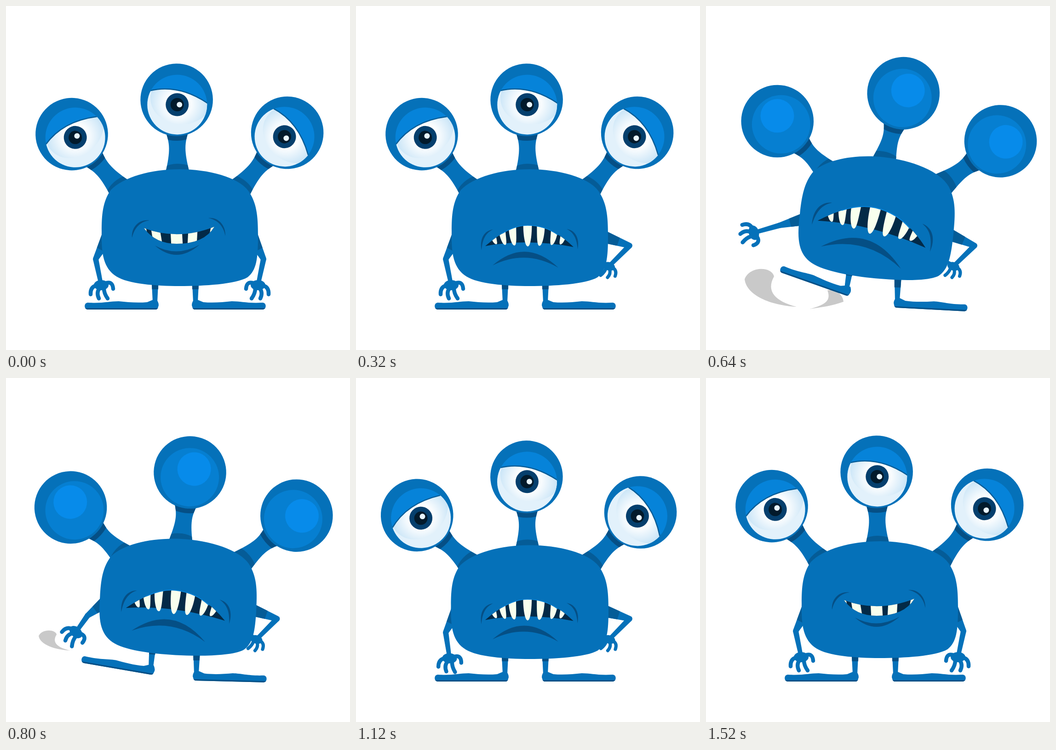
An HTML page with a canvas for the animation above (1600 ms loop, 748 by 748 pixels).

```html
<!DOCTYPE html>
<html lang="en">
<head>
<meta charset="utf-8">
<title>Three-eyed monster</title>
<style>
  html, body { margin: 0; width: 100%; height: 100%; overflow: hidden; background: #fff; }
  canvas { display: block; width: 100vw; height: 100vh; }
</style>
</head>
<body>
<canvas id="stage" width="748" height="748"></canvas>
<script>
const ctx = document.getElementById('stage').getContext('2d');
const LOOP = 1600, STEP = 80;
const SKIN = '#0571b9', SHADE = '#055c97', DARK = '#054f85', LID = '#0683d9',
      MOUTH = '#032a47', TOOTH = '#f8ffee', DUST = '#c9c9c9';

// Each part rests somewhere and is pushed by weighted moods
const rig = {
  body: { // x, y, rotation, scale x, scale y
    rest: [378, 482, 0, 1, 1], lean: [-6.5, -18, 5.8, 0, 0],
    yell: [1, -4, .2, -.01, .04], squat: [-.5, 10.5, 0, .015, -.05] },
  tilts: { // stalk angles
    rest: [-41.5, -.7, 40.3], lean: [-4, 16.5, 17.2], yell: [1, 0, -4.3], droop: [-9, 0, 6.4] },
  leftArm: { // elbow, palm, hand rotation, hand scale
    rest: [195, 550, 207, 607, 0, 1], lean: [-30, -59, -65, -69, 34, 0],
    yell: [-5, -14, -38, -45, 41, 0], squat: [0, 6, -7, 5, 8, 0] },
  rightArm: {
    rest: [560, 550, 548, 607, 0, 1], hip: [35, -29, 2, -41, 17, -.17],
    lean: [-11, 0, -12, 0, 0, 0], squat: [0, 5, 1, 5, 0, 0] },
  leftFoot: { rest: [325, 652, 0], lean: [-18, -30, 19.5] }, // heel, rotation
  rightFoot: { rest: [411, 652, 0], lean: [4, -4, 3] },
  frown: { rest: [0, 0, 0, 1], lean: [0, 0, 2, 0], yell: [-7, -6, 5.5, .26] } // offset, rotation, scale
};

// Piecewise linear curve through [time, value] points
function curve(t, ...points) {
  const i = points.findIndex(p => p[0] > t);
  if (i === 0) return points[0][1];
  if (i < 0) return points[points.length - 1][1];
  const [t0, a] = points[i - 1], [t1, b] = points[i];
  return a + (b - a) * (t - t0) / (t1 - t0);
}

const moodsAt = t => ({
  lean: curve(t, [320, 0], [480, 1], [560, 1.15], [640, 1], [960, 0]),
  yell: curve(t, [480, 0], [640, 1], [960, 0]),
  squat: curve(t, [640, 0], [960, 1], [1280, 0]),
  droop: curve(t, [640, 0], [960, 1], [1280, .25], [1520, 0]),
  hip: curve(t, [0, 0], [320, 1], [1120, 1], [1280, .33], [1440, 0]),
  lid: curve(t, [480, 0], [640, 1], [800, 1], [960, 0])
});

const pose = ({ rest, ...pushes }, moods) => rest.map((v, i) =>
  Object.entries(pushes).reduce((sum, [mood, push]) => sum + moods[mood] * push[i], v));

const rad = deg => deg * Math.PI / 180;

function at(x, y, deg, sx, sy, draw) {
  ctx.save();
  ctx.translate(x, y);
  ctx.rotate(rad(deg));
  ctx.scale(sx, sy);
  draw();
  ctx.restore();
}

function fill(path, color) {
  ctx.fillStyle = color;
  ctx.fill(new Path2D(path));
}

function stroke(path, color, width) {
  ctx.strokeStyle = color;
  ctx.lineWidth = width;
  ctx.stroke(new Path2D(path));
}

function oval(x, y, rx, ry, color) {
  ctx.beginPath();
  ctx.ellipse(x, y, rx, ry, 0, 0, 7);
  ctx.fillStyle = color;
  ctx.fill();
}

const disc = (x, y, r, color) => oval(x, y, r, r, color);

function clipped(path, draw) {
  ctx.save();
  ctx.clip(new Path2D(path));
  draw();
  ctx.restore();
}

function limb(x1, y1, x2, y2, w1, w2, color) {
  const d = Math.hypot(x2 - x1, y2 - y1), nx = (y1 - y2) / d, ny = (x2 - x1) / d;
  fill(`M${x1 + nx * w1} ${y1 + ny * w1}L${x2 + nx * w2} ${y2 + ny * w2}
        L${x2 - nx * w2} ${y2 - ny * w2}L${x1 - nx * w1} ${y1 - ny * w1}Z`, color);
}

// Body-relative point to stage
function onBody([x, y, deg, sx, sy], px, py) {
  const c = Math.cos(rad(deg)), s = Math.sin(rad(deg));
  return [x + px * sx * c - py * sy * s, y + px * sx * s + py * sy * c];
}

function drawDust(t) {
  if (t < 400 || t > 960) return;
  if (t < 640) {
    const k = (t - 480) / 80;
    return oval(214.5 - 21 * k, 635.5 - 8 * k, 61 + 32 * k, 27.5 + 12 * k, DUST);
  }
  const k = (t - 640) / 320, right = Math.max(0, 1 - 2 * k);
  at(115 - 50 * k, 600 - 72 * k, 0, 1 - .78 * k, 1 - .94 * k, () =>
    fill('M82 54C35 42 15 20 33-12C28-34-20-35-31-6C-27 29 25 51 82 54', DUST));
  if (right) at(275 - 60 * k, 640 - 30 * k, 0, right, right, () =>
    fill('M-50 19C-13 9-3 0-11-22C5-25 22-15 24 3C0 12-25 15-50 19', DUST));
  if (t >= 880) stroke('M39.5 551Q41 545 47 541', DUST, 1);
}

function drawFoot([x, y, deg], flip) {
  at(x, y - 8, deg / 2, flip, 1, () => {
    fill('M-6 0L-9-60H7L4 0Z', SKIN);
    fill('M-7.5-28L-9-60H7L6-28Z', DARK);
  });
  at(x, y, deg, flip, 1, () => {
    const foot = 'M-147-7C-115-5-100-10-80-10C-60-8-40-6-18-8L-6-13H3Q9-4 6 2Q5 8 0 8H-147C-156 8-156-7-147-7';
    fill(foot, SKIN);
    clipped(foot, () => {
      ctx.fillStyle = DARK;
      ctx.fillRect(-160, 5, 180, 4);
    });
  });
}

function drawStalk(length) {
  const end = length + 8, bend = length - 45;
  const stalk = `M-26 66C-16 95-14 ${bend}-27 ${end}H27C14 ${bend} 16 95 26 66Z`;
  fill(stalk, SKIN);
  clipped(stalk, () => {
    oval(0, end, 42, 23, SHADE);
    disc(0, 0, 89, DARK);
  });
}

function drawEyeball(lid) {
  if (lid >= 1) {
    disc(0, 0, 63.5, '#067fd1');
    disc(7, -19, 36.5, '#078bea');
    return;
  }
  disc(0, 0, 65, LID);
  clipped('M-65 0A65 65 0 0 0 65 0A65 65 0 0 0-65 0', () => {
    const drop = lid * 110;
    const edge = `M-80 ${drop - 28}L-59 ${drop - 31}Q3 ${drop - 45} 65 ${drop - 3}L80 ${drop + 10}`;
    clipped(edge + 'V200H-80Z', () => {
      disc(0, 0, 70, '#e2f1fb');
      const glow = ctx.createRadialGradient(2, -2, 24, 2, -2, 68);
      glow.addColorStop(0, '#fff');
      glow.addColorStop(1, '#c4e2f6');
      oval(10, -14, 68, 57, glow);
      disc(0, 0, 25, '#053f6d');
      disc(0, 0, 14.5, '#021a2b');
      disc(5, 0, 6, '#e8f5fd');
    });
    stroke(edge, SHADE, 2.5);
  });
}

function drawEye([x, y], tilt, length, lid) {
  at(x, y, tilt, 1, 1, () => {
    ctx.translate(0, -length);
    drawStalk(length);
    disc(0, 0, 78.8, SKIN);
    ctx.translate(1, 10.5);
    drawEyeball(lid);
  });
}

function drawArm([sx, sy], [ex, ey, hx, hy]) {
  limb(sx, sy, ex, ey, 14, 6, SKIN);
  limb(sx, sy, sx + (ex - sx) * .6, sy + (ey - sy) * .6, 14, 9.2, SHADE);
  disc(ex, ey, 6, SKIN);
  limb(ex, ey, hx, hy, 6, 4.5, SKIN);
}

function drawHand([, , x, y, deg, scale], flip) {
  at(x, y, deg, flip * scale, scale, () => {
    oval(0, 0, 16, 11, SKIN);
    ctx.lineCap = 'round';
    stroke('M-12 1Q-24 5-23 20M-4 7Q-11 17-5 29M6 7Q6 18 14 29M12-5Q25-8 26 8', SKIN, 8.5);
  });
}

function drawSmile() {
  clipped('M-77-40Q-3-12 76-43Q54-6-6-6Q-52-6-77-40', () => {
    ctx.fillStyle = MOUTH;
    ctx.fillRect(-80, -50, 160, 60);
    for (const [x, w] of [[-78, 8], [-60, 19], [-19, 25], [19, 20], [66, 14]])
      fill(`M${x * 1.06}-50h${w}L${x * .92 + w} 0h${-w}Z`, TOOTH);
  });
  fill('M-103-19C-105-42-88-60-65-57C-84-54-97-43-103-19', DARK);
  fill('M100-23C101-46 85-64 63-62C82-58 95-47 100-23', DARK);
  fill('M-53-2Q-6 39 44-4Q-6 24-53-2', DARK);
}

function drawFrown() {
  const top = 'M-96-1Q-44-46-4-46Q48-46 96 1';
  fill(top + 'Q-4-18-96-1', MOUTH);
  clipped(top + 'V40H-96Z', () => {
    for (const x of [-82, -60, -37, -4, 25, 55, 77]) {
      const w = 9.5 - Math.abs(x) * .035, tip = x * .88, low = -Math.abs(x) * .06;
      fill(`M${x - w}-48C${x - w}-24 ${tip - 6} ${low} ${tip} ${low}
            C${tip + 6} ${low} ${x + w}-24 ${x + w}-48Z`, TOOTH);
    }
  });
  stroke('M-60-28Q-30-46-4-46Q34-46 62-25', LID, 1.5);
  fill('M-104 8C-109-18-97-35-79-37C-94-30-102-18-104 8', DARK);
  fill('M105 6C110-20 98-36 81-38C95-31 103-20 105 6', DARK);
  fill('M-80 41Q-8-21 63 46Q-8 5-80 41', DARK);
}

function draw(t) {
  ctx.fillStyle = '#fff';
  ctx.fillRect(0, 0, 748, 748);
  drawDust(t);

  const moods = moodsAt(t), { lean, yell, droop, lid } = moods;
  const torso = pose(rig.body, moods), tilts = pose(rig.tilts, moods);
  const left = pose(rig.leftArm, moods), right = pose(rig.rightArm, moods);

  drawFoot(pose(rig.leftFoot, moods), 1);
  drawFoot(pose(rig.rightFoot, moods), -1);

  const slide = 3 * lean + 5 * yell;
  [[-133, -88], [-5, -124], [134, -89]].forEach(([x, y], i) =>
    drawEye(onBody(torso, x + slide, y), tilts[i], 154 - 6 * yell - 4 * droop, lid));

  drawArm(onBody(torso, -156, 18), left);
  drawArm(onBody(torso, 156, 18), right);

  at(...torso, () => fill(`M0-127C62-127 127-110 149-80C167-54 170-27 170 18
    C170 66 167 93 147 108C122 123 52 127 0 127C-53 127-113 122-138 106
    C-166 88-171 58-170 8C-170-27-168-57-150-82C-123-110-63-127 0-127`, SKIN));

  const [mx, my] = onBody(torso, -1, 41);
  if (t < 160 || t >= 1440) {
    at(mx, my, 0, 1, 1, drawSmile);
  } else {
    const [dx, dy, deg, scale] = pose(rig.frown, moods);
    at(mx + dx, my + dy, torso[2] + deg, scale, scale, drawFrown);
  }

  drawHand(left, 1);
  drawHand(right, -1);
}

function tick() {
  draw(Math.floor(performance.now() % LOOP / STEP) * STEP);
  requestAnimationFrame(tick);
}
tick();
</script>
</body>
</html>
```
